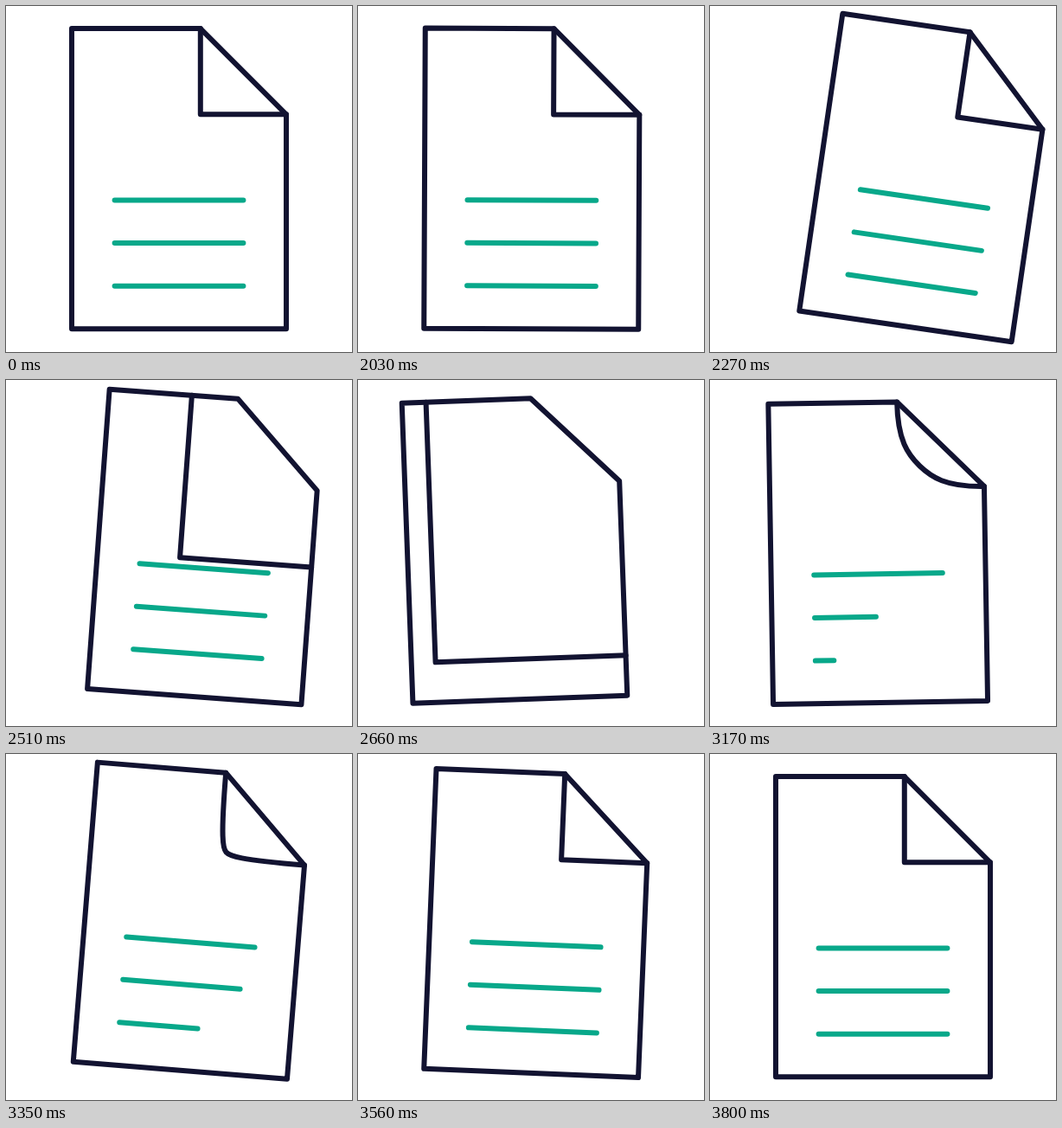
These frames come from a looping animation (400 by 400 pixels, 3830 ms). An HTML page:

```html
<!DOCTYPE html>
<html lang="en">
<head>
<meta charset="utf-8">
<title>Document icon</title>
<style>
  html, body { margin: 0; width: 100%; height: 100%; overflow: hidden; background: #fff; }
  svg { display: block; width: 100vw; height: 100vh; }
  path { fill: none; stroke: #121331; stroke-width: 6; stroke-linecap: round; stroke-linejoin: round; }
  #lines path { stroke: #08a88a; }
  #flap { fill: #fff; stroke: none; }
</style>
</head>
<body>
<svg viewBox="0 0 400 400">
  <g id="page">
    <g id="lines"><path/><path/><path/></g>
    <path id="flap"/>
    <path id="fold"/>
    <path id="outline"/>
  </g>
</svg>
<script>
const LOOP = 3830, START = 2000, STEP = 30;
const UNIT = 49.6, LEFT = 76, TOP = 26.1;
const col = n => LEFT + n * UNIT;
const row = n => TOP + n * UNIT;
const $ = id => document.getElementById(id);
const page = $('page'), flap = $('flap'), fold = $('fold');
const lines = [...document.querySelectorAll('#lines path')];

$('outline').setAttribute('d',
  `M${col(0)} ${row(0)}H${col(3)}L${col(5)} ${row(2)}V${row(7)}H${col(0)}Z`);

// Smooth curve through [time, value] points, flat at every extreme.
function track(points) {
  const slope = i => (points[i + 1][1] - points[i][1]) / (points[i + 1][0] - points[i][0]);
  const tangents = points.map((_, i) => {
    if (i === 0 || i === points.length - 1) return 0;
    const a = slope(i - 1), b = slope(i);
    return a * b <= 0 ? 0 : 2 * a * b / (a + b);
  });
  return t => {
    if (t <= points[0][0]) return points[0][1];
    const i = points.findIndex(p => p[0] >= t) - 1;
    if (i < 0) return points[points.length - 1][1];
    const [t0, a] = points[i], [t1, b] = points[i + 1];
    const d = t1 - t0, u = (t - t0) / d, v = 1 - u;
    return a * v * v * (1 + 2 * u) + b * u * u * (3 - 2 * u)
      + d * u * v * (tangents[i] * v - tangents[i + 1] * u);
  };
}

const angle = track([[2000, 0], [2030, 0.25], [2270, 8.29], [2320, 8.9], [2540, 3.2], [2660, -2.1],
  [2870, -7.5], [3020, -5.96], [3080, -4.4], [3355, 4.65], [3620, 1.6], [3800, 0]]);
const shiftX = track([[2000, 0], [2030, 1], [2270, 51], [2320, 55], [2540, 24.5], [2660, -19],
  [2840, -36.5], [3020, -28.5], [3080, -19.8], [3365, 15.6], [3620, 4.6], [3800, 0]]);
const shiftY = track([[2000, 0], [2320, -1.6], [2540, -7], [2660, -4],
  [2850, 2.2], [3000, 2.9], [3080, 2.5], [3350, -7], [3620, -3.2], [3800, 0]]);

function ease(t, from, to) {
  const u = Math.min(1, Math.max(0, (t - from) / (to - from)));
  return u * u * (3 - 2 * u);
}
const mix = (a, b, p) => a + (b - a) * p;

const TURN = [2320, 2790];
const NEW_FOLD = [2815, 3528];
const GROW = [[2690, 3180], [2909, 3448], [3041, 3580]];

// The old flap sweeps down to the lower left corner.
function turningFold(t) {
  const p = ease(t, ...TURN);
  const x = mix(col(3), col(0), p), y = mix(row(2), row(7), p);
  return `M${mix(col(3), x, 1)} ${row(0)}V${y}H${col(5)}`;
}

// The new flap bulges out of the crease and sharpens into a corner.
function newFold(t) {
  const p = ease(t, ...NEW_FOLD);
  const x = mix(col(4), col(3), p), y = mix(row(1), row(2), p);
  const h = 25 * (1 - p) + 2 * p * (1 - p), reach = 90 * p;
  return `M${col(3)} ${row(0)}C${col(3)} ${row(0) + reach} ${x - h} ${y - h} ${x} ${y}`
    + `C${x + h} ${y + h} ${col(5) - reach} ${row(2)} ${col(5)} ${row(2)}`;
}

function render(t) {
  const turning = t < TURN[1];
  page.setAttribute('transform',
    `translate(${shiftX(t)} ${shiftY(t)}) rotate(${angle(t)} 200 199.7)`);

  const edge = turning ? turningFold(t) : newFold(t);
  fold.setAttribute('d', edge);
  flap.setAttribute('d', turning ? edge + `V${row(2)}L${col(3)} ${row(0)}Z` : '');

  lines.forEach((line, i) => {
    const grown = turning ? 1 : ease(t, ...GROW[i]);
    line.setAttribute('d', grown > 0 ? `M${col(1)} ${row(4 + i)}h${3 * UNIT * grown}` : '');
  });
}

const origin = performance.now();
function tick() {
  const t = (performance.now() - origin) % LOOP;
  render(START + Math.max(0, Math.floor((t - START) / STEP)) * STEP);
  requestAnimationFrame(tick);
}
tick();
</script>
</body>
</html>
```
